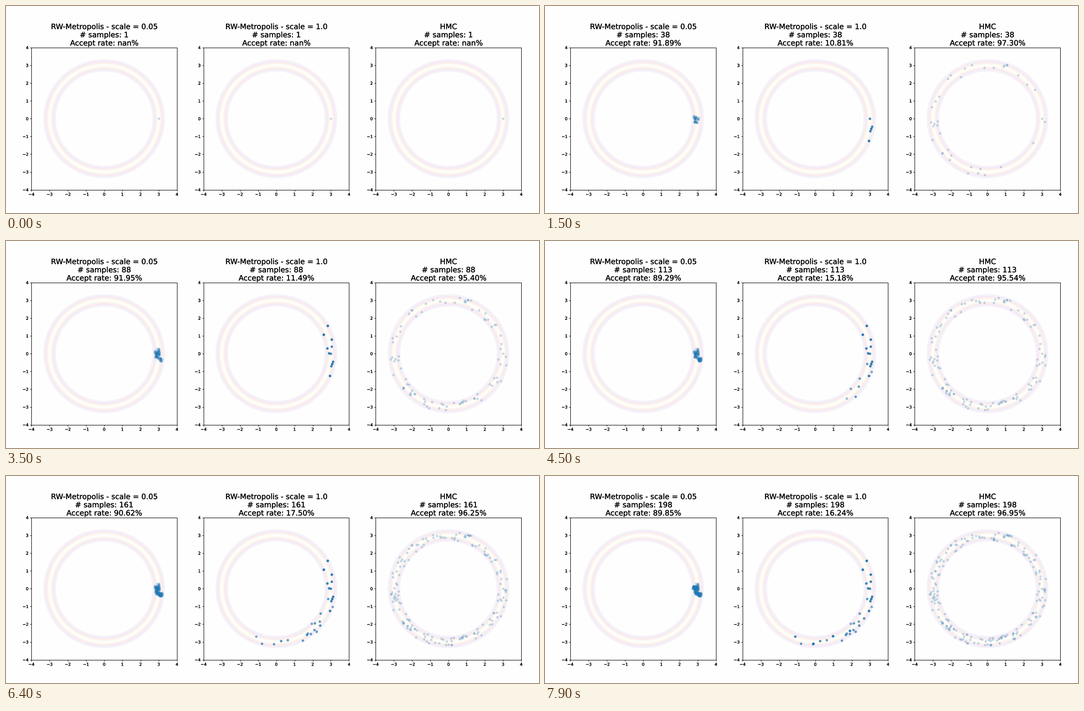
A matplotlib script for the animation above (8000 ms loop, 1200 by 467 pixels).

```python
import matplotlib.pyplot as plt
import numpy as np
from matplotlib.animation import FuncAnimation
from matplotlib.patheffects import withStroke

W, H, DPI = 1200, 467, 100
FRAMES, INTERVAL = 80, 100
PACE = 2.5    # samples per frame
K = 2 / 3     # scale from default point sizes to this stage
CHECKS = [1, 21, 56, 88, 113, 161, 198]  # sample counts with a known tally
TITLE_BASE, TITLE_PITCH = 89.1, 18.5     # pixels from the top
HEAVIER = [withStroke(linewidth=0.2, foreground="black")]

plt.rcParams.update({
    "font.family": "DejaVu Sans",
    "font.size": 10 * K,
    "axes.linewidth": 1.2 * K,
    "axes.facecolor": "#fefefe",
    "figure.facecolor": "#fefefe",
})
for axis in ("xtick", "ytick"):
    plt.rcParams.update({
        f"{axis}.major.size": 3.5 * K,
        f"{axis}.major.width": 1.2 * K,
        f"{axis}.major.pad": 3.5 * K,
    })

rng = np.random.default_rng(7)


def along(keys, steps):
    return np.interp(steps, *np.transpose(keys))


class Sampler:
    """A chain that wanders around the ring between a few polar keys.

    Keys pair the number of accepted moves with an angle or a radius.
    """

    def __init__(self, name, tally, angles, radii, swing, spread):
        self.name = name
        samples = np.arange(1, CHECKS[-1] + 1)
        self.accepted = np.rint(np.interp(samples, CHECKS, tally)).astype(int)
        steps = np.arange(tally[-1] + 1)
        noise = rng.uniform(-1, 1, (2, len(steps)))
        noise[:, 0] = 0
        angle = np.radians(along(angles, steps) + swing * noise[0])
        radius = along(radii, steps) + spread * noise[1]
        moves = np.column_stack([radius * np.cos(angle),
                                 radius * np.sin(angle)])
        self.points = moves[self.accepted]

    def rate(self, n):
        if n == 1:
            return "nan%"
        return f"{100 * self.accepted[n - 1] / (n - 1):.2f}%"


class Panel:
    def __init__(self, fig, index, sampler):
        self.sampler = sampler
        left, width = 57.2 + 387.6 * index, 327.6
        self.ax = fig.add_axes([left / W, 52.4 / H, width / W, 320.8 / H])
        self.ax.set(xlim=(-4, 4), ylim=(-4, 4),
                    xticks=range(-4, 5), yticks=range(-4, 5))
        for label in self.ax.get_xticklabels() + self.ax.get_yticklabels():
            label.set_path_effects(HEAVIER)
        self.draw_ring()
        self.dots = self.ax.scatter([], [], s=20 * K ** 2, color="C0",
                                    alpha=0.2, linewidths=1.5 * K, zorder=3)
        middle = (left + width / 2) / W
        self.lines = [
            fig.text(middle, 1 - (TITLE_BASE - TITLE_PITCH * row) / H, "",
                     size=18 * K, ha="center", va="baseline",
                     path_effects=HEAVIER)
            for row in (2, 1, 0)
        ]

    def draw_ring(self):
        side = np.linspace(-4, 4, 400)
        x, y = np.meshgrid(side, side)
        density = np.exp(-(np.hypot(x, y) - 3) ** 2 / 0.045)
        self.ax.contour(x, y, density, levels=np.arange(1, 10) / 10,
                        cmap="plasma", vmin=0, vmax=1, alpha=0.075,
                        linewidths=1.4 * K)

    def show(self, n):
        self.dots.set_offsets(self.sampler.points[:n])
        texts = (self.sampler.name, f"# samples: {n}",
                 f"Accept rate: {self.sampler.rate(n)}")
        for line, text in zip(self.lines, texts):
            line.set_text(text)


samplers = [
    Sampler("RW-Metropolis - scale = 0.05",
            tally=[0, 19, 50, 80, 100, 145, 177],
            angles=[(0, 0), (19, 1.5), (28, -5), (44, 5), (68, -6.5),
                    (125, -5), (140, 1), (177, 1.5)],
            radii=[(0, 3), (19, 2.83), (28, 2.92), (36, 2.85), (44, 3),
                   (60, 2.93), (68, 3.15), (100, 3.13), (108, 2.95),
                   (177, 2.8)],
            swing=1.8, spread=0.09),
    Sampler("RW-Metropolis - scale = 1.0",
            tally=[0, 2, 7, 10, 17, 28, 32],
            angles=[(0, 0), (2, -21), (9, 29), (11, -13), (17, -58),
                    (20, -39), (28, -111), (32, -34)],
            radii=[(0, 3)], swing=3, spread=0.28),
    Sampler("HMC",
            tally=[0, 20, 52, 83, 107, 154, 191],
            angles=[(0, 0), (2, -17), (3, -86), (8, -115), (15, -180),
                    (20, -280), (23, -327), (32, -180), (42, -100),
                    (52, -32), (72, 300), (191, 1740)],
            radii=[(0, 3)], swing=12, spread=0.27),
]

fig = plt.figure(figsize=(W / DPI, H / DPI), dpi=DPI)
panels = [Panel(fig, i, sampler) for i, sampler in enumerate(samplers)]


def update(frame):
    n = int(1 + PACE * frame)
    for panel in panels:
        panel.show(n)


anim = FuncAnimation(fig, update, frames=FRAMES, init_func=lambda: update(0),
                     interval=INTERVAL, repeat=True, repeat_delay=0)
plt.show()
```
